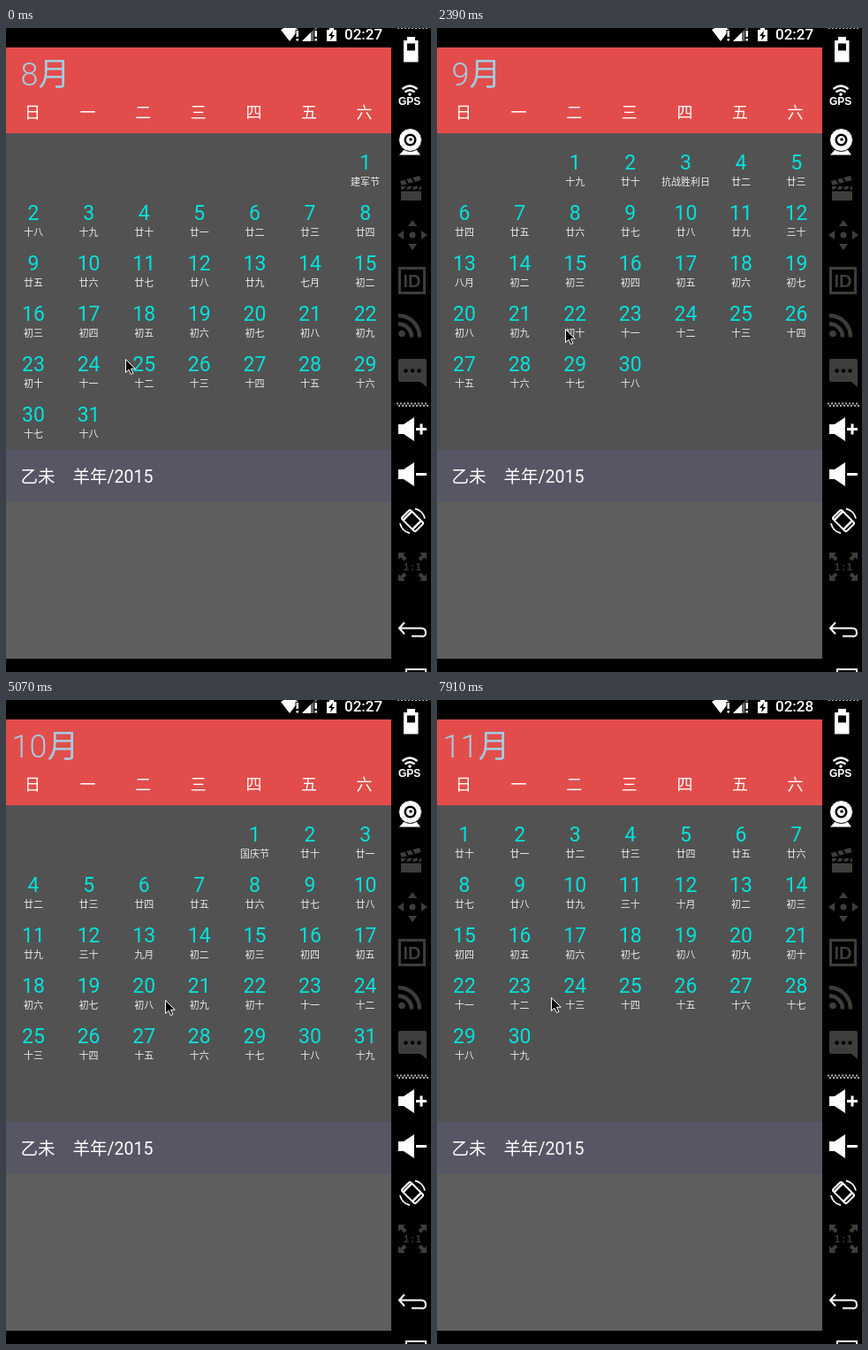
Recreate the animation shown at these times as an HTML page. Size 481 by 728 pixels, loop 8000 ms.

```html
<!DOCTYPE html>
<html lang="zh-CN">
<head>
<meta charset="utf-8">
<style>
html, body { margin: 0; width: 100%; height: 100%; overflow: hidden; background: #000 }
svg { display: block; font-family: Roboto, "Noto Sans CJK SC", "Noto Sans CJK", sans-serif }
.mid { text-anchor: middle }
.bold { font-family: "Liberation Sans", Arial, sans-serif; font-weight: bold }
</style>
</head>
<body>
<svg width="481" height="728" viewBox="0 0 481 728">
  <rect width="481" height="728"/>
  <path fill="#e24d4b" d="M0 22h436v97H0z"/>
  <path fill="#525252" d="M0 119h436v358H0z"/>
  <path fill="#575665" d="M0 477h436v59H0z"/>
  <path fill="#5e5e5e" d="M0 536h436v177H0z"/>

  <!-- status bar -->
  <g fill="#fff">
    <path d="M311 2Q321-5 331 2L321 15z"/>
    <path fill="#666" d="M335 15L352-2V15z"/>
    <path d="M335 15L345 5V15z"/>
    <path stroke="#000" stroke-width="2" paint-order="stroke" d="M328.500 3h2.500v7h-2.500zM328.500 12h2.500v2.500h-2.500zM349.500 3h2.500v7h-2.500zM349.500 12h2.500v2.500h-2.500z"/>
    <path d="M363 2h3V0h5v2h3v13h-11z"/>
    <path fill="#000" d="M370 3l-5 6h3l-1 5 5-6h-3z"/>
    <text id="clock" x="383" y="13" font-size="17" font-weight="500"></text>
  </g>

  <text id="title" class="mid" x="44.500" y="65" font-size="36" font-weight="300" fill="#a3cbdf"></text>
  <g id="week" class="mid" font-size="18" font-weight="300" fill="#fff"></g>
  <g id="days" class="mid"></g>
  <g font-size="19.500" fill="#fff">
    <text x="16.500" y="514">乙未</text>
    <text x="75.500" y="514">羊年/2015</text>
  </g>

  <!-- side bar -->
  <g fill="none" stroke="#aaa" stroke-width="2" stroke-dasharray="2 2">
    <path d="M443 0h35M442 424.500h36M444 427h35"/>
  </g>
  <g fill="#fff">
    <path fill-rule="evenodd" d="M450 14h4v-4h9v4h3.500v24.500H450zM454 17.500v8h9v-8z"/>
    <text class="bold" x="444" y="87" font-size="12">GPS</text>
    <path fill="none" stroke="#fff" stroke-width="2.400" d="M448.500 69q8.500-7 17 0M451.500 72.500q5.500-4.500 11 0"/>
    <circle cx="457" cy="75" r="1.800"/>
    <path d="M450 138h15l4 5.500h-24z"/>
    <circle cx="457.500" cy="126.500" r="13" stroke="#000"/>
    <circle cx="457.500" cy="126.500" r="7" fill="#000"/>
    <circle cx="457.500" cy="126.500" r="4.500"/>
    <circle cx="458" cy="126" r="1.800" fill="#000"/>
    <path id="speaker" d="M444 448h6l12-8v27l-12-8h-6z"/>
    <use href="#speaker" y="51"/>
    <path d="M464 452h4.500v-4.500h3V452h4.500v3h-4.500v4.500h-3V455H464zM464 503h12v3h-12z"/>
  </g>

  <g fill="#3d3d3c">
    <path d="M447 179h23v16h-23zM446 173l22-6 1.500 5-22 6z"/>
    <path stroke="#000" stroke-width="2" d="M452 171l3 5M459 169l3 5M451 183l3-4M458 183l3-4M465 183l3-4M447 183.500h23"/>
    <path d="M460 217l5 7h-10zM460 251l5-7h-10zM443 234l7-5v10zM477 234l-7-5v10z"/>
    <circle cx="460" cy="234" r="3.500"/>
    <path fill="none" stroke="#3d3d3c" stroke-width="3" d="M445.500 271.500h28v28h-28z"/>
    <text class="bold mid" x="459.500" y="293" font-size="20">ID</text>
    <circle cx="448" cy="345.500" r="3.800"/>
    <path fill="none" stroke="#3d3d3c" stroke-width="4.500" d="M444 334.500a15 15 0 0 1 15 15M444 325a24 24 0 0 1 24 24.500"/>
    <path d="M446 374h28q2 0 2 2v30l-7-6h-23q-2 0-2-2v-22q0-2 2-2z"/>
    <g fill="#000"><circle cx="452.500" cy="387.500" r="2.300"/><circle cx="460" cy="387.500" r="2.300"/><circle cx="467.500" cy="387.500" r="2.300"/></g>
    <path id="corner" d="M444 593h8l-2.500 2.500 4 4-3 3-4-4L444 601z"/>
    <use href="#corner" transform="rotate(90 460 609)"/>
    <use href="#corner" transform="rotate(180 460 609)"/>
    <use href="#corner" transform="rotate(270 460 609)"/>
    <text class="bold mid" x="461" y="613" font-size="11" letter-spacing="2">1:1</text>
  </g>

  <g fill="none" stroke="#fff" stroke-width="2">
    <g transform="rotate(-45 460 557)">
      <rect x="453" y="546" width="14" height="22" rx="2"/>
      <path d="M453 564h14M453 549h14" stroke-width="2.500"/>
    </g>
    <path d="M446 560a14 14 0 0 0 11 11M463 543.500a14 14 0 0 1 11 11" stroke-width="1.800"/>
    <path d="M451 672l-6 6.500 6 6.500M445 678.500h25q5 0 5 5t-5 4h-11"/>
    <path d="M453 740v-15h22v15"/>
  </g>

  <path id="cursor" fill="#000" stroke="#fff" d="M.5.500v15l3.500-3.300 2.400 5.300 2.500-1.100-2.400-5.200h4.700z"/>
</svg>
<script>
const LOOP = 8000, STEP = 149.2;
const $ = id => document.getElementById(id);
const NUM = '一二三四五六七八九十';

// month number, lunar day of the 1st, lunar month length, first step shown, holidays
const months = [
  { m: 8, lunar: 17, len: 29, from: 0, feast: { 1: '建军节' } },
  { m: 9, lunar: 19, len: 30, from: 16, feast: { 3: '抗战胜利日' } },
  { m: 10, lunar: 19, len: 30, from: 33, feast: { 1: '国庆节' } },
  { m: 11, lunar: 20, len: 30, from: 50, feast: {} }
];

// pointer path: step, x, y
const path = [
  [0, 135, 374], [5, 389, 346], [11, 389, 346], [12, 380, 346], [14, 240, 342],
  [16, 145, 340], [17, 200, 341], [19, 380, 343], [20, 392, 344], [21, 392, 344],
  [22, 392, 345], [23, 390, 346], [24, 390, 346], [25, 389, 347], [28, 389, 347],
  [29, 384, 347], [34, 180, 339], [36, 198, 341], [41, 363, 341], [43, 388, 342],
  [45, 388, 342], [46, 384, 342], [51, 132, 336], [52, 125, 336], [53, 129, 336]
];

const text = (x, y, s, attrs = '') => `<text x="${x}" y="${y}" ${attrs}>${s}</text>`;

function lunarName(d, month) {
  if (d === 1) return month + '月';
  const tens = d === 30 ? '三' : d >= 20 ? '廿' : d > 10 ? '十' : '初';
  return tens + NUM[(d - 1) % 10];
}

function drawMonth({ m, lunar, len, feast }) {
  const first = new Date(2015, m - 1, 1).getDay();
  const count = new Date(2015, m, 0).getDate();
  let out = '';
  for (let d = 1; d <= count; d++) {
    const cell = first + d - 1;
    const x = 31 + cell % 7 * 62.6, y = 160 + Math.floor(cell / 7) * 57;
    const ld = (lunar + d - 2) % len + 1;
    out += text(x, y, d, 'font-size="23" fill="#00e2dc"') +
      text(x, y + 18, feast[d] || lunarName(ld, NUM[m - 2]), 'font-size="11" fill="#eee"');
  }
  $('days').innerHTML = out;
  $('title').textContent = m + '月';
}

function pointer(k) {
  const i = path.findIndex(p => p[0] >= k);
  if (i < 1) return (i ? path[path.length - 1] : path[0]).slice(1);
  const a = path[i - 1], b = path[i], f = (k - a[0]) / (b[0] - a[0]);
  return [1, 2].map(j => Math.round(a[j] + (b[j] - a[j]) * f));
}

$('week').innerHTML = [...'日一二三四五六'].map((s, i) => text(30 + i * 62.6, 101.5, s)).join('');

let shown;
function frame(now) {
  const k = Math.floor((now % LOOP + 8) / STEP);
  const month = months.filter(o => o.from <= k).pop();
  if (month !== shown) drawMonth(shown = month);
  $('clock').textContent = k < 42 ? '02:27' : '02:28';
  $('cursor').setAttribute('transform', `translate(${pointer(k)})`);
  requestAnimationFrame(frame);
}
frame(performance.now());
</script>
</body>
</html>
```
